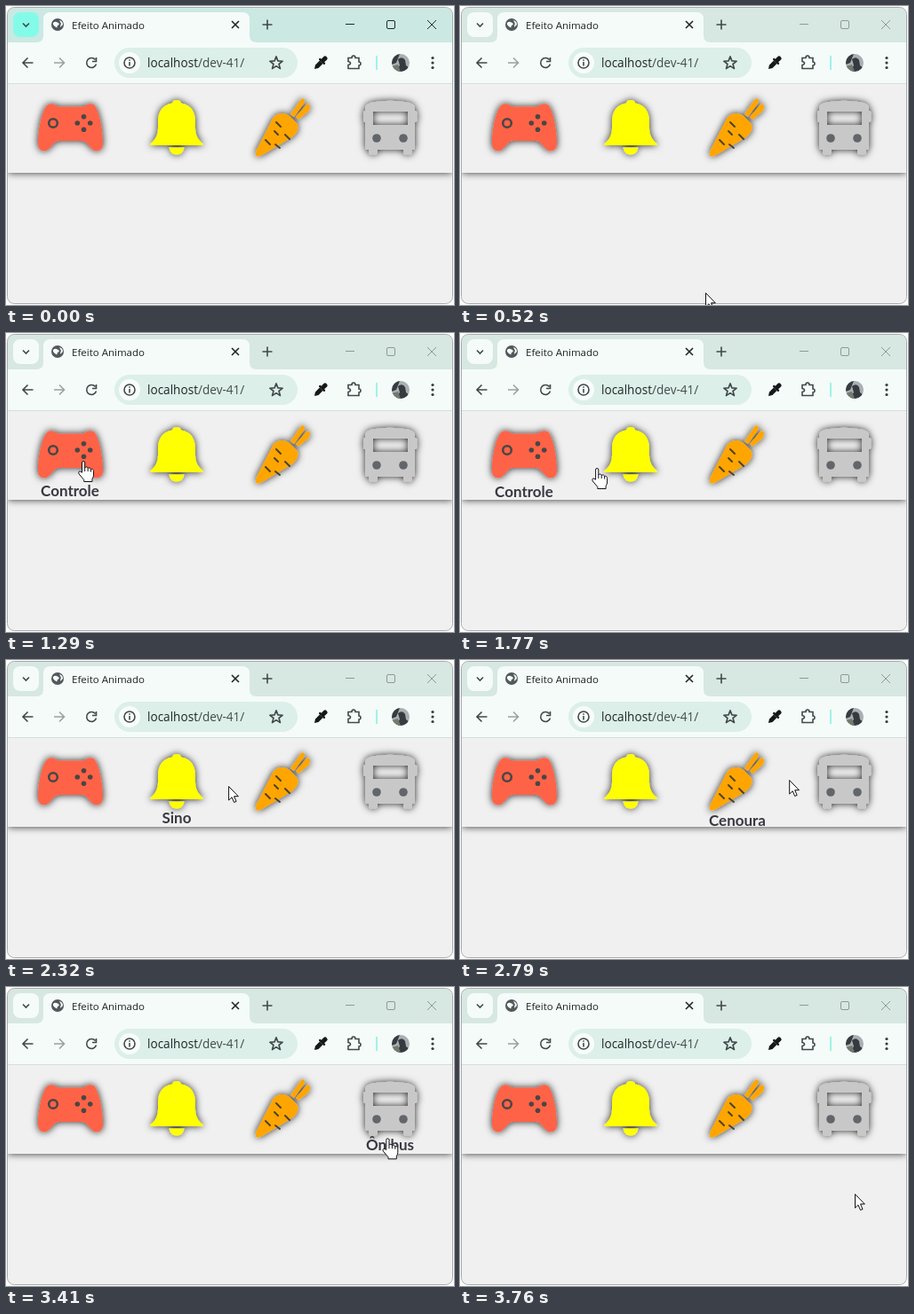
These frames come from a looping animation (504 by 337 pixels, 4900 ms). An HTML page:

```html
<!DOCTYPE html>
<html lang="pt">
<head>
<meta charset="utf-8">
<title>Efeito Animado</title>
<style>
  html, body { margin: 0; width: 100%; height: 100%; overflow: hidden; background: #fff; }
  svg { display: block; width: 100vw; height: 100vh; }
  .ui { font-family: "Open Sans", "Noto Sans", sans-serif; }
  .label { font: 700 17px Lato, sans-serif; fill: #3a3942; text-anchor: middle; }
  .line { fill: none; stroke: #41494a; stroke-width: 1.6; }
</style>
</head>
<body>
<svg viewBox="0 0 504 337">
  <defs>
    <clipPath id="frame"><rect x="2" y="2" width="500" height="333" rx="8"/></clipPath>
    <clipPath id="panel"><rect x="2" y="88" width="500" height="100"/></clipPath>
    <clipPath id="face"><circle cx="444" cy="64" r="10"/></clipPath>
    <filter id="glow" x="-30%" y="-30%" width="160%" height="160%">
      <feDropShadow dx="0" dy="0" stdDeviation="4" flood-color="#000" flood-opacity=".85"/>
    </filter>
    <filter id="drop" x="-5%" y="-20%" width="110%" height="140%">
      <feDropShadow dx="0" dy="0" stdDeviation="4.5" flood-color="#000" flood-opacity=".8"/>
    </filter>
  </defs>

  <g clip-path="url(#frame)">
    <rect width="504" height="337" fill="#f0f0f0"/>
    <rect x="2" y="88" width="500" height="100" fill="#f0f0f0" filter="url(#drop)"/>

    <g filter="url(#glow)" fill="#ff6347">
      <path d="M47 111.5Q52 109 56 112Q57.5 113.5 60 113.5H86Q88 113.5 89.5 112Q94 109 99 111.5C104 116 109 138 109 155Q109 163 102 163.5C95 163.5 92 152 86 152H59C53 152 50 163.5 43 163.5Q36 163 36 155C36 138 41 116 47 111.5Z"/>
    </g>
    <circle cx="53" cy="132" r="4.8" fill="none" stroke="#4a4645" stroke-width="2.6"/>
    <g id="pads" fill="#4a4645"></g>

    <g filter="url(#glow)" fill="#ff0">
      <path d="M162 157Q162 155 165 153Q171 147 171 138V130C171 118 177 111 187 109.5Q187.5 106 192 106Q196.5 106 197 109.5C207 111 213 118 213 130V138Q213 147 219 153Q222 155 222 157Z"/>
      <path d="M183.5 159.5H200.5Q199 167.5 192 167.5Q185 167.5 183.5 159.5Z"/>
    </g>

    <g filter="url(#glow)" fill="#ffa500">
      <path d="M281.5 169Q280 167 282 162L299 129Q302 122 309 121Q315 120.500 320 125L327 132Q330 137 327 142Q325 146 320 149L289 167.500Q284 170.500 281.500 169Z"/>
      <path d="M320 122L332 105Q334.500 103 336 106Q336 108 335 110L324 125Z"/>
      <path d="M326 125L338 111Q341 109 342 113L341 118L329 128Z"/>
    </g>
    <path d="M304 131L309 136M292 151L297 156M303 156L308 160M314 145L319 150M302 141L306 145" stroke="#4d4230" stroke-width="2" stroke-linecap="round"/>

    <g filter="url(#glow)" fill="#c8c8c8">
      <path fill-rule="evenodd" d="M404 160V114Q405 110 412 108.500Q432 105 452 108.500Q459 110 460 114V118Q462.500 118 462.500 121V129Q462.500 131 460 131V160Q460 162 457 162V165Q457 167.500 454 167.500H450Q447 167.500 447 165V162H418V165Q418 167.500 415 167.500H411Q408 167.500 408 165V162Q404 162 404 160V131Q402 131 402 129V121Q402 118 404 118ZM413 119V134H452V119Z"/>
    </g>
    <g fill="#62666a"><circle cx="417" cy="149" r="4.8"/><circle cx="447" cy="149" r="4.8"/></g>

    <g id="labels" clip-path="url(#panel)"></g>

    <!-- browser bars -->
    <rect id="bar" width="504" height="42"/>
    <rect id="menu" x="8" y="7" width="29" height="28" rx="8"/>
    <path class="line" d="M19 19.500L22.500 23L26 19.500"/>
    <path d="M34 41Q42 41 42 33V15Q42 7 50 7H266Q274 7 274 15V33Q274 41 282 41H504V87.500H0V41Z" fill="#f4fbf9"/>
    <path d="M2 87.500H502" stroke="#d5dfdc"/>
    <circle cx="58" cy="21" r="7" fill="#52585b"/>
    <path d="M53 19Q55 17 58 18.500Q61 20 59 21.500Q57 22 57.500 24Q56 25 53 21ZM60 16Q64 17 64 21L61 24Q61 21 62 20Z" fill="#f4fbf9"/>
    <g class="ui">
      <text x="74" y="25.500" font-size="11.500" fill="#202526">Efeito Animado</text>
    </g>
    <path class="line" stroke-width="1.500" d="M254 17L262 25M262 17L254 25" style="stroke:#202526"/>
    <path class="line" d="M288.500 21H299.500M294 15.500V26.500"/>
    <g id="caption" fill="none">
      <path d="M382 20.500H392M474 16L484 26M484 16L474 26"/>
      <rect x="428.500" y="16.500" width="9" height="9" rx="1.500"/>
    </g>

    <path class="line" d="M30.500 64H19M24.500 58.500L19 64L24.500 69.500"/>
    <path class="line" style="stroke:#9aa3a2" d="M54 64H65.500M60 58.500L65.500 64L60 69.500"/>
    <path class="line" d="M100.500 60.500A5.500 5.500 0 1 0 101.500 65.500M101.500 58V62.500H97"/>
    <rect x="122" y="47" width="206" height="34" rx="17" fill="#dcefe9"/>
    <circle cx="139" cy="64" r="12" fill="#f8fdfb"/>
    <circle class="line" cx="139" cy="64" r="6" stroke-width="1.300"/>
    <path class="line" d="M139 63V67.500M139 60.200V61.700"/>
    <text class="ui" x="159" y="69" font-size="13.600" fill="#202526">localhost<tspan fill="#434b4b">/dev-41/</tspan></text>
    <path id="star" class="line" stroke-linejoin="round"/>
    <g transform="translate(354 64) rotate(45)" fill="#161819">
      <rect x="-2.500" y="-9.500" width="5" height="7" rx="2"/>
      <rect x="-4.500" y="-3.500" width="9" height="2.500" rx="1"/>
      <path d="M-2.500 -1H2.500V6L0 10L-2.500 6Z"/>
    </g>
    <path class="line" d="M385 58.500H389Q389 56 391 56Q393 56 393 58.500H397V63Q399 63 399 65Q399 67 397 67V70.500H385V66.500Q387.500 66 387.500 64.500Q387.500 63 385 62.500Z"/>
    <path d="M417 56V72" stroke="#9ff3e6" stroke-width="2"/>
    <g clip-path="url(#face)">
      <rect x="434" y="54" width="20" height="20" fill="#a9b0b3"/>
      <path d="M434 54H443L439 64L434 66ZM441 60Q446 56 449 61L450 67L454 70V74H438L443 67Z" fill="#363b40"/>
      <path d="M434 68L441 66L444 74H434Z" fill="#74796f"/>
    </g>
    <g fill="#353c3d"><circle cx="480" cy="58.500" r="1.600"/><circle cx="480" cy="64" r="1.600"/><circle cx="480" cy="69.500" r="1.600"/></g>
  </g>
  <rect x="1.500" y="1.500" width="501" height="334" rx="8" fill="none" stroke="#a4a9a8"/>

  <g id="cursor" fill="#fff" stroke="#111" stroke-linejoin="round">
    <path id="arrow" d="M.5 .5V16L4 12.700L6.500 18.500L9 17.400L6.500 11.700H11.300Z"/>
    <g id="hand">
      <path d="M-1.500 13V2Q-1.500 .5 0 .5Q1.700 .5 1.700 2V8Q2.200 6.800 3.600 7Q5 7.200 5.100 8.500Q5.800 7.500 7.200 8Q8.400 8.400 8.500 9.800Q9.500 8.900 10.600 9.600Q11.500 10.200 11.500 11.500V16Q11.500 18.500 10 20.500V23.500H.7V21.500L-4.800 15Q-6 13 -4.500 12Q-3.300 11.300 -1.500 13.500"/>
      <path d="M1.700 8V12M5.100 8.500V12M8.500 9.800V12.500" fill="none"/>
    </g>
  </g>
</svg>
<script>
const LOOP = 4900, SLIDE = 260;
const $ = id => document.getElementById(id);

function add(parent, name, attrs, text = '') {
  const el = document.createElementNS('http://www.w3.org/2000/svg', name);
  for (const k in attrs) el.setAttribute(k, attrs[k]);
  el.textContent = text;
  return $(parent).appendChild(el);
}

for (let i = 0; i < 4; i++) {
  const a = i * Math.PI / 2;
  add('pads', 'circle', { cx: 87.5 + 7.2 * Math.cos(a), cy: 132 + 7.2 * Math.sin(a), r: 2.8 });
}

$('star').setAttribute('d', 'M' + Array.from({ length: 10 }, (_, i) => {
  const r = i % 2 ? 3.2 : 7.6, a = i * Math.PI / 5;
  return [304 + r * Math.sin(a), 64.5 - r * Math.cos(a)].map(v => v.toFixed(1));
}).join('L') + 'Z');

const links = [
  { text: 'Controle', x: 72, show: 1020, hide: 1720 },
  { text: 'Sino', x: 192, show: 1763, hide: 2300 },
  { text: 'Cenoura', x: 312, show: 2390, hide: 2730 },
  { text: 'Ônibus', x: 432, show: 2865, hide: 3470 }
];
for (const l of links) l.el = add('labels', 'text', { class: 'label', x: l.x, y: 204 }, l.text);

// Pointer track: time, x, y
const track = [
  [250, 310, 338], [410, 290, 328], [570, 262, 318], [730, 240, 311],
  [800, 217, 290], [940, 132, 214], [1010, 99, 183], [1150, 90, 157], [1290, 87, 144],
  [1620, 95, 145], [1763, 154, 152], [1907, 190, 150], [2050, 201, 147],
  [2180, 210, 146], [2317, 250, 142], [2454, 306, 138], [2660, 343, 136],
  [2730, 353, 136], [2798, 370, 135], [2935, 408, 134], [3073, 419, 132], [3210, 419, 132],
  [3270, 420, 135], [3480, 434, 188], [3620, 442, 222], [3760, 444, 233]
];

// Bursts of redraws: first, last, count
const bursts = [
  [250, 730, 7], [800, 1290, 8], [1620, 2050, 7],
  [2180, 2660, 8], [2730, 3210, 8], [3270, 3760, 8]
];

function held(t) {
  let q = 0;
  for (const [a, b, n] of bursts) {
    const step = (b - a) / (n - 1);
    if (t >= a) q = a + step * Math.min(n - 1, Math.floor((t - a + 9) / step));
  }
  return q;
}

function pointer(t) {
  const i = track.findIndex(k => k[0] > t);
  if (i < 0) return track[track.length - 1].slice(1);
  const [t0, x0, y0] = track[Math.max(0, i - 1)], [t1, x1, y1] = track[i];
  const p = t1 > t0 ? (t - t0) / (t1 - t0) : 0;
  return [x0 + (x1 - x0) * p, y0 + (y1 - y0) * p];
}

function ease(p) {
  p = Math.max(0, Math.min(1, p));
  return p * p * (3 - 2 * p);
}

function draw(time) {
  const t = held(time), active = t < 250;
  $('bar').setAttribute('fill', active ? '#cbe8e2' : '#d7e7e2');
  $('menu').setAttribute('fill', active ? '#84fbe8' : '#f4fbf9');
  $('caption').setAttribute('stroke', active ? '#222829' : '#8f9997');

  const [x, y] = pointer(t);
  const over = y > 88 && y < 188 && links.some(l => Math.abs(x - l.x) < 45);
  $('cursor').setAttribute('transform', `translate(${x.toFixed(1)} ${y.toFixed(1)})`);
  $('cursor').setAttribute('visibility', active ? 'hidden' : 'visible');
  $('hand').setAttribute('display', over ? 'inline' : 'none');
  $('arrow').setAttribute('display', over ? 'none' : 'inline');

  for (const l of links) {
    const up = ease((t - l.show) / SLIDE) - ease((t - l.hide) / SLIDE);
    l.el.setAttribute('y', (204 - 20 * up).toFixed(2));
  }
}

const start = performance.now();
function tick() {
  draw((performance.now() - start) % LOOP);
  requestAnimationFrame(tick);
}
tick();
</script>
</body>
</html>
```
